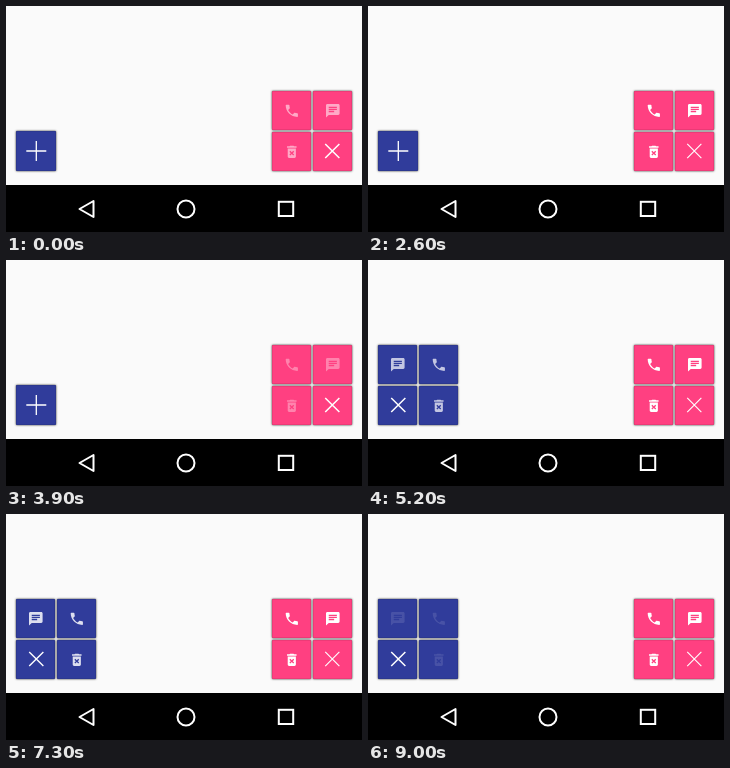
An HTML page that plays this animation: 356 by 226 pixels, repeating every 9.1 s.

```html
<!DOCTYPE html>
<html lang="en">
<head>
<meta charset="utf-8">
<title>Expanding square menus</title>
<style>
  html, body { margin: 0; width: 100%; height: 100%; overflow: hidden; background: #fafafa; }
  svg { display: block; width: 100vw; height: 100vh; }
  .tile { stroke: #000; stroke-opacity: .22; stroke-width: .7; filter: drop-shadow(.6px .8px 1px rgba(0, 0, 0, .6)); }
  .icon { fill: #fff; }
  .cross { stroke: #fff; }
  .nav { fill: none; stroke: #fff; stroke-width: 2; stroke-linejoin: round; }
</style>
</head>
<body>
<svg id="stage" viewBox="0 0 356 226" xmlns="http://www.w3.org/2000/svg">
  <rect width="356" height="226" fill="#fafafa"/>
  <rect y="179" width="356" height="47" fill="#000"/>
  <g class="nav">
    <path d="M73.5 203L87.5 195V211Z"/>
    <circle cx="180" cy="203" r="8.5"/>
    <rect x="272.8" y="195.8" width="14.4" height="14.2" stroke-linejoin="miter"/>
  </g>
</svg>
<script>
const LOOP = 9100, STEP = 100;
const OPEN_MS = 300, CLOSE_MS = 250, FADE_FROM = 280, FADE_MS = 745;
const BOTTOM = 165, SIDE = 40;
const stage = document.getElementById('stage');

const ICONS = {
  phone: 'M6.62 10.79c1.44 2.83 3.76 5.14 6.59 6.59l2.2-2.2c.27-.27.67-.36 1.02-.24 1.12.37 2.33.57 3.57.57.55 0 1 .45 1 1V20c0 .55-.45 1-1 1-9.39 0-17-7.61-17-17 0-.55.45-1 1-1h3.5c.55 0 1 .45 1 1 0 1.25.2 2.45.57 3.57.11.35.03.74-.25 1.02z',
  chat: 'M20 2H4c-1.1 0-2 .9-2 2v18l4-4h14c1.1 0 2-.9 2-2V4c0-1.1-.9-2-2-2zM6 9h12v2H6zm8 5H6v-2h8zm4-6H6V6h12z',
  bin: 'M6 19c0 1.1.9 2 2 2h8c1.1 0 2-.9 2-2V7H6zm2.46-7.12l1.41-1.41L12 12.59l2.12-2.12 1.41 1.41L13.41 14l2.12 2.12-1.41 1.41L12 15.41l-2.12 2.12-1.41-1.41L10.59 14zM15.5 4l-1-1h-5l-1 1H5v2h14V4z'
};

// Events are [time, opens]; side is the corner that stays fixed.
const menus = [
  { color: '#303c9b', side: 'left', edge: 10, icons: ['chat', 'phone', null, 'bin'],
    events: [[-2000, 0], [4575, 1], [5850, 0], [6575, 1], [7870, 0], [8675, 1]] },
  { color: '#ff4081', side: 'right', edge: 346, icons: ['phone', 'chat', 'bin', null],
    events: [[-525, 1], [650, 0], [1575, 1], [2850, 0], [3475, 1]] }
];

const clamp = v => Math.min(1, Math.max(0, v));
const ease = p => (1 - Math.cos(Math.PI * p)) / 2;
const slowDown = p => 1 - (1 - p) ** 2;

function set(el, attrs) {
  for (const key in attrs) el.setAttribute(key, attrs[key]);
  return el;
}
function add(parent, tag, attrs) {
  return parent.appendChild(set(document.createElementNS(stage.namespaceURI, tag), attrs));
}

function build(menu) {
  const group = add(stage, 'g', {});
  menu.tiles = menu.icons.map(() => add(group, 'rect', { class: 'tile', fill: menu.color, rx: .8 }));
  menu.glyphs = menu.icons.map(name => name && add(group, 'path', { class: 'icon', d: ICONS[name] }));
  menu.cross = add(group, 'path', { class: 'cross', d: 'M-10 0H10M0 -10V10' });
}

function pose(menu, time) {
  const [start, opens] = menu.events.filter(e => e[0] <= time).pop();
  const age = time - start;
  if (opens) return {
    spread: ease(clamp(age / OPEN_MS)),
    fade: slowDown(clamp((age - FADE_FROM) / FADE_MS)),
    line: 1.5 - .4 * clamp((age - 625) / 300)
  };
  return { spread: 1 - ease(clamp(age / CLOSE_MS)), fade: 1 - clamp(age / 150), line: 1.3 };
}

function draw(menu, time) {
  const { spread, fade, line } = pose(menu, time);
  const whole = SIDE * (1 + spread), gap = 2 * spread, size = (whole - gap) / 2;
  const left = menu.side === 'left' ? menu.edge : menu.edge - whole;
  const top = BOTTOM - whole;
  const closed = spread < .001;

  menu.tiles.forEach((tile, i) => {
    const x = left + (i % 2) * (size + gap), y = top + (i >> 1) * (size + gap);
    const full = closed && i === 0;
    set(tile, {
      x, y, width: full ? whole : size, height: full ? whole : size,
      visibility: closed && i ? 'hidden' : 'visible'
    });
    const glyph = menu.glyphs[i];
    if (!glyph) return;
    const scale = .68 * size / 39;
    set(glyph, {
      transform: `translate(${x + size / 2 + .3} ${y + size / 2 + .3}) scale(${scale}) translate(-12 -12)`,
      opacity: fade
    });
  });

  const cx = menu.side === 'left' ? menu.edge + SIDE / 2 : menu.edge - SIDE / 2;
  set(menu.cross, {
    transform: `translate(${cx + .3} ${BOTTOM - SIDE / 2}) rotate(${45 * spread})`,
    'stroke-width': line
  });
}

function render(now) {
  const time = Math.floor((now % LOOP) / STEP) * STEP;
  menus.forEach(menu => draw(menu, time));
}

menus.forEach(build);
const begin = performance.now();
function tick() {
  render(performance.now() - begin);
  requestAnimationFrame(tick);
}
tick();
</script>
</body>
</html>
```
